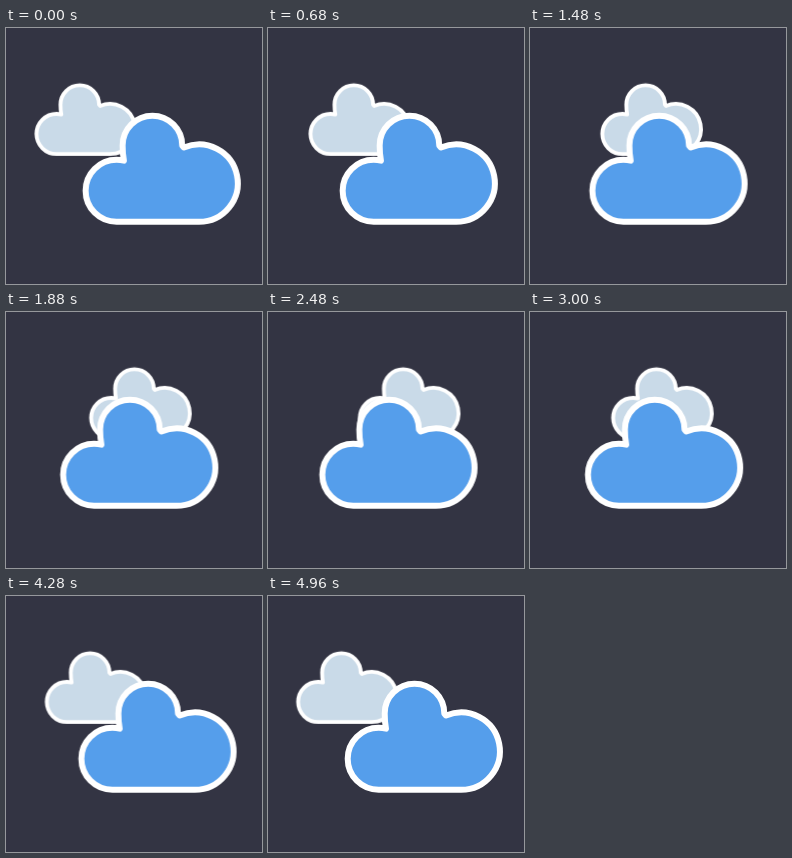
Animation, 256 px wide and 256 px high, one loop 5000 ms. Source, as an HTML page:

```html
<!DOCTYPE html>
<html lang="en">
<head>
<meta charset="utf-8">
<title>Drifting clouds</title>
<style>
  html, body { margin: 0; width: 100%; height: 100%; overflow: hidden; background: #333443; }
  svg { display: block; width: 100vw; height: 100vh; }
  path { stroke: #fff; stroke-width: 6; stroke-linejoin: round; }
</style>
</head>
<body>
<svg viewBox="0 0 256 256">
  <defs>
    <path id="cloud" d="M110.7 193.8A31 31 0 0 1 110.7 131.8Q114.5 131.8 118 132.7Q116.7 126 116.7 117.5A29.8 29.8 0 0 1 176.3 117.5L178 119.5A38.7 38.7 0 1 1 193.1 193.8Z"/>
  </defs>
  <g id="back"><use href="#cloud" fill="#c9dae8" transform="translate(-21.5 .4) scale(.648)"/></g>
  <g id="front"><use href="#cloud" fill="#559eeb"/></g>
</svg>
<script>
  const LOOP = 5000, TURN = 2380, REST = 4960;
  const easing = 'cubic-bezier(.333, 0, .667, 1)';

  // Drift sideways by dx, then return to the start.
  function drift(id, dx) {
    const at = (x, time) => ({ transform: `translateX(${x}px)`, offset: time / LOOP, easing });
    const anim = document.getElementById(id).animate(
      [at(0, 0), at(dx, TURN), at(0, REST), at(0, LOOP)],
      { duration: LOOP, iterations: Infinity }
    );
    anim.startTime = 0;
  }

  drift('back', 62);
  drift('front', -25.5);
</script>
</body>
</html>
```
